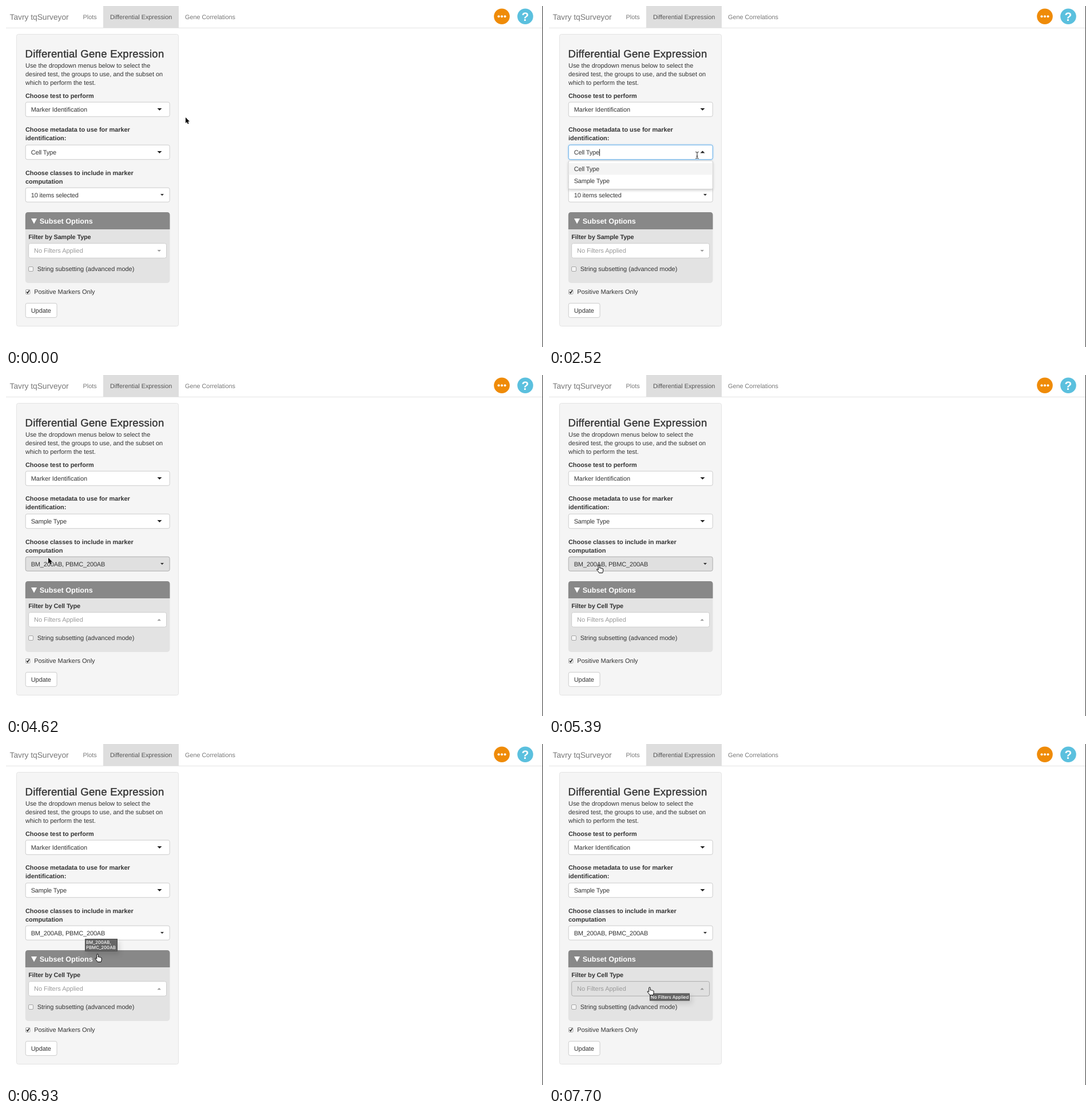
Write an HTML page that moves like this. It is 939 by 597 pixels and loops after 8 s.

```html
<!DOCTYPE html>
<html lang="en">
<head>
<meta charset="utf-8">
<title>Differential expression panel</title>
<style>
  html, body { margin: 0; width: 100%; height: 100%; overflow: hidden; background: #fff; }
  svg { display: block; }
  text { font: 10.95px "Liberation Sans", Arial, sans-serif; fill: #333; text-rendering: geometricPrecision; }
  .nav { font-size: 10.85px; fill: #777; }
  .brand { font-size: 13.75px; fill: #777; }
  .title { font-size: 18.5px; letter-spacing: .28px; stroke: #333; stroke-width: .4px; }
  .bold { font-weight: bold; font-size: 10.9px; }
  .tight { letter-spacing: -.12px; }
  .head { font-weight: bold; font-size: 12.6px; fill: #fff; }
  .tip text { font: 500 7.8px Inter, sans-serif; fill: #fff; }
  .tip rect { fill: #666; stroke: #4a4a4a; filter: drop-shadow(4px 5px 4px rgba(0,0,0,.12)); }
  .box { fill: #fff; stroke: #ccc; }
  .hover { fill: #e0e0e0; stroke: #adadad; }
  .focus { stroke: #66afe9; filter: drop-shadow(0 0 1.5px rgba(102,175,233,.6)); }
  .mute { fill: #999; }
  .check { fill: #f4f4f4; stroke: #a6a6a6; }
  #menu .panel { fill: #fff; stroke: #d2d2d2; filter: drop-shadow(0 2px 2px rgba(0,0,0,.18)); }
</style>
</head>
<body>
<svg width="939" height="597" viewBox="0 0 939 597">
  <rect width="939" height="597" fill="#fff"/>
  <rect y="38" width="939" height="1" fill="#e4e4e4"/>
  <rect x="170" width="132" height="38" fill="#dedede"/>
  <text class="brand" x="6.5" y="24">Tavry tqSurveyor</text>
  <text class="nav" x="134.5" y="23.3">Plots</text>
  <text class="nav" x="182" y="23.3" style="fill:#555">Differential Expression</text>
  <text class="nav" x="313" y="23.3">Gene Correlations</text>
  <circle cx="867" cy="18.3" r="13.8" fill="#ef8b08"/>
  <g fill="#fff"><circle cx="861.5" cy="18.3" r="2"/><circle cx="867" cy="18.3" r="2"/><circle cx="872.5" cy="18.3" r="2"/></g>
  <circle cx="908" cy="18.3" r="13.8" fill="#5bc0de"/>
  <text x="908" y="26" text-anchor="middle" style="font-size:21px;font-weight:bold;fill:#fff">?</text>

  <rect x="18.5" y="49.5" width="283" height="511" rx="3" fill="#f5f5f5" stroke="#e3e3e3"/>
  <text class="title" x="33.5" y="89.6">Differential Gene Expression</text>
  <text x="34" y="108.4">Use the dropdown menus below to select the</text>
  <text x="34" y="123.3">desired test, the groups to use, and the subset on</text>
  <text x="34" y="138.2">which to perform the test.</text>

  <text class="bold" x="34" y="160.6">Choose test to perform</text>
  <rect class="box" x="34.2" y="168.3" width="252" height="25.4" rx="3"/>
  <text x="43.7" y="185.2">Marker Identification</text>
  <path d="M264.5 179h8l-4 4z" fill="#222"/>

  <text class="bold" x="34" y="220.4">Choose metadata to use for marker</text>
  <text class="bold" x="34" y="235.2">identification:</text>
  <rect id="meta" class="box" x="34.2" y="243.3" width="252" height="25.4" rx="3"/>
  <text id="metaText" class="tight" x="43.7" y="260.4"></text>
  <path id="metaArrow" fill="#222"/>
  <rect id="caret" x="88" y="250.5" width="1" height="12" fill="#222"/>

  <text class="bold" x="34" y="296">Choose classes to include in marker</text>
  <text class="bold" x="34" y="310.8">computation</text>
  <rect id="classes" x="34.2" y="318.2" width="252" height="25" rx="3"/>
  <text id="classText" class="tight" x="43.7" y="334.5"></text>
  <path d="M270 329h6l-3 3.2z" fill="#333"/>

  <rect x="33.8" y="361" width="252.7" height="124" rx="5" fill="#e3e3e3"/>
  <path d="M33.8 391v-25q0-5 5-5h242.7q5 0 5 5v25z" fill="#888"/>
  <path d="M44 372h10l-5 9.500z" fill="#fff"/>
  <text class="head" x="58.7" y="381">Subset Options</text>
  <text id="filterLabel" class="bold tight" x="39.3" y="408.4"></text>
  <rect id="filter" x="39.6" y="415.6" width="241" height="25.6" rx="3"/>
  <text class="mute" x="49" y="432.4">No Filters Applied</text>
  <path id="filterArrow" class="mute"/>
  <rect class="check" x="39.5" y="456.5" width="8" height="8" rx="1.5"/>
  <text x="54.7" y="464.3">String subsetting (advanced mode)</text>

  <rect class="check" x="34.5" y="496.5" width="7.5" height="8" rx="1.5"/>
  <path d="M36 500.5l1.800 2.200 3-5" fill="none" stroke="#222" stroke-width="1.5"/>
  <text x="49.2" y="504.2">Positive Markers Only</text>
  <rect class="box" x="34.2" y="520.4" width="54.8" height="25" rx="3"/>
  <text x="43.7" y="537.2">Update</text>

  <g id="menu">
    <rect class="panel" x="34.2" y="271" width="252" height="49.5" rx="2"/>
    <rect id="row" x="34.7" width="251" height="20.5" fill="#f4f4f4"/>
    <text class="tight" x="43.7" y="289.4">Cell Type</text>
    <text class="tight" x="43.7" y="310">Sample Type</text>
  </g>

  <g id="tip1" class="tip">
    <rect x="138.5" y="341.5" width="56" height="21"/>
    <text x="140" y="349.7">BM_200AB,</text>
    <text x="140" y="358.9">PBMC_200AB</text>
  </g>
  <g id="tip2" class="tip">
    <rect x="176.5" y="437" width="69" height="12"/>
    <text x="178" y="445.8">No Filters Applied</text>
  </g>

  <rect x="938" width="1" height="597" fill="#333"/>
  <g id="cursor">
    <circle id="ring" r="20.3" fill="none" stroke="#000" stroke-width="2"/>
    <path id="arrow" d="M0 0V10L2.3 7.900 3.900 11.500 5.600 10.700 4 7.300H7z" fill="#000" stroke="#fff" stroke-width=".8" paint-order="stroke"/>
    <path id="beam" d="M-2.8-5.5Q0-5.5 0-4 0-5.5 2.8-5.5M0-4V4.5M-2.8 6Q0 6 0 4.5 0 6 2.8 6M-1.5 2H1.5" fill="none" stroke="#222"/>
    <path id="hand" d="M-1.3 8.2V1.2a1.2 1.2 0 0 1 2.5 0V5q1.4-.8 2.2.4 1.4-.7 2 .5 1.6-.4 1.7 1.2V9.5q-.2 2-1 4H.2Q-1.5 10.5-3.8 8.2-4.3 6.6-2.7 6.8z" fill="#fff" stroke="#000"/>
  </g>
</svg>
<script>
const LOOP = 8000, STEP = 70;
const $ = id => document.getElementById(id);
const show = (id, on) => $(id).setAttribute('visibility', on ? 'visible' : 'hidden');
const set = (id, name, value) => $(id).setAttribute(name, value);

// Pointer path: time, x, y
const path = [
  [0, 314, 195], [140, 307, 200], [280, 293, 209], [420, 288, 206], [770, 288, 206],
  [910, 286, 213], [1120, 277, 237], [1260, 266, 258], [1400, 260, 264], [1470, 260, 264],
  [1680, 259, 261], [2940, 259, 261], [3080, 235, 268], [3290, 140, 295], [3430, 92, 304],
  [3570, 79, 306], [4480, 79, 306], [4620, 74, 320], [4760, 69, 331], [5110, 69, 331],
  [5250, 74, 332], [5390, 87.5, 333], [5530, 120, 332], [5670, 138, 331],
  [6580, 138, 331], [6720, 143, 340], [6930, 160, 368], [7140, 170, 400], [7280, 174, 411],
  [7350, 174, 411], [7560, 176, 422], [7700, 176, 426], [LOOP, 176, 426]
];

function pointerAt(t) {
  const i = path.findIndex(p => p[0] > t);
  const [t0, x0, y0] = path[i - 1], [t1, x1, y1] = path[i];
  const k = (t - t0) / (t1 - t0);
  return [x0 + (x1 - x0) * k, y0 + (y1 - y0) * k];
}

function pointerKind(t, y) {
  if (t < 2450) return 'arrow';
  if (t < 3990 && y < 271) return 'beam';
  if (t < 4550) return 'hand';
  return t < 5040 || (y > 391 && y < 415) ? 'arrow' : 'hand';
}

function draw(now) {
  const t = Math.floor(now % LOOP / STEP) * STEP;
  const within = (a, b) => t >= a && t < b;
  const [x, y] = pointerAt(t);
  const open = within(2450, 3990), sample = t >= 3990, updated = t >= 4060;

  set('meta', 'class', open ? 'box focus' : 'box');
  $('metaText').textContent = sample ? 'Sample Type' : 'Cell Type';
  set('metaArrow', 'd', open ? 'M264.5 257.5h8l-4-4z' : 'M264.5 254h8l-4 4z');
  show('caret', open && !within(3010, 3500));
  show('menu', open);
  set('row', 'y', t > 3000 && y > 295 ? 295.5 : 275);

  $('classText').textContent = updated ? 'BM_200AB, PBMC_200AB' : '10 items selected';
  set('classes', 'class', t > 4500 && y > 318 && y < 344 ? 'box hover' : 'box');
  $('filterLabel').textContent = `Filter by ${updated ? 'Cell' : 'Sample'} Type`;
  set('filter', 'class', y > 415 ? 'box hover' : 'box');
  set('filterArrow', 'd', updated ? 'M264.5 430.2h6.5l-3.25-3.3z' : 'M264.5 427h6.5l-3.25 3.3z');

  show('tip1', within(6440, 7070));
  show('tip2', t >= 7700);

  set('cursor', 'transform', `translate(${x} ${y})`);
  show('ring', within(2380, 2520) || within(3920, 4060));
  const kind = pointerKind(t, y);
  for (const id of ['arrow', 'beam', 'hand']) show(id, id === kind);
}

let start;
function tick(now) {
  start ??= now;
  draw(now - start);
  requestAnimationFrame(tick);
}
draw(0);
requestAnimationFrame(tick);
</script>
</body>
</html>
```
